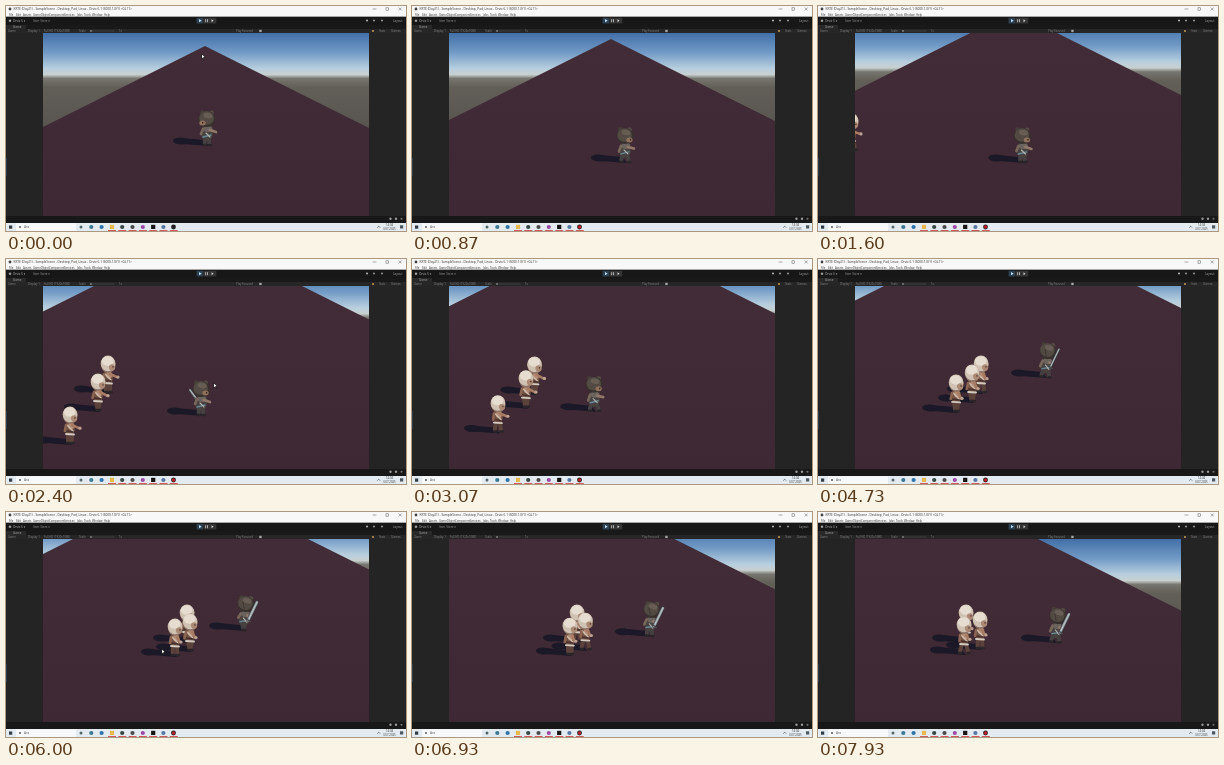
An HTML page with a canvas for the animation above (8 s loop, 400 by 225 pixels).

```html
<!DOCTYPE html>
<html lang="en">
<head>
<meta charset="utf-8">
<title>Game view</title>
<style>
html, body { margin: 0; width: 100%; height: 100%; overflow: hidden; background: #191919; }
#stage { position: relative; width: 400px; height: 225px; overflow: hidden; }
canvas { position: absolute; left: 0; top: 0; width: 400px; height: 225px; }
span { position: absolute; font: 3px/4px "Open Sans", sans-serif; white-space: pre; }
</style>
</head>
<body>
<div id="stage"><canvas id="view"></canvas></div>
<script>
const LOOP = 8000, STEP = 1000 / 15;
const stage = document.getElementById("stage");
const canvas = document.getElementById("view");
const ratio = Math.max(1, window.devicePixelRatio || 1);
canvas.width = 400 * ratio;
canvas.height = 225 * ratio;
const c = canvas.getContext("2d");
c.scale(ratio, ratio);

// Shared key times for the camera and the actors
const KEYS = [0, 870, 2400, 3800, 4730, 6000, 7930];
const leftEdge = [225, 211, 88, 66, 66, 67, -10];
const rightEdge = [173, 187, 296, 321, 319, 302, 220];
const skyShift = [0, 0, -14, -20, -20, -20, 0];
const hero = { x: [201, 213, 195, 168, 227, 237, 237], y: [113, 130, 130, 121, 92, 92, 104] };
const foes = [
  { x: [-60, -30, 102, 145, 163, 181, 148], y: [125, 125, 105, 107, 105, 101, 101] },
  { x: [-70, -40, 92, 138, 154, 184, 162], y: [145, 145, 123, 116, 114, 110, 108] },
  { x: [-95, -65, 64, 110, 138, 169, 146], y: [175, 175, 156, 132, 124, 115, 113] }
];

function at(list, t) {
  let i = 0;
  while (i < KEYS.length - 2 && t > KEYS[i + 1]) i++;
  const k = Math.min(1, (t - KEYS[i]) / (KEYS[i + 1] - KEYS[i]));
  return list[i] + (list[i + 1] - list[i]) * k;
}

function rect(color, x, y, w, h) {
  c.fillStyle = color;
  c.fillRect(x, y, w, h);
}

function oval(color, x, y, rx, ry = rx, turn = 0) {
  c.fillStyle = color;
  c.beginPath();
  c.ellipse(x, y, rx, ry, turn, 0, 7);
  c.fill();
}

function poly(color, ...p) {
  c.fillStyle = color;
  c.beginPath();
  for (let i = 0; i < p.length; i += 2) c.lineTo(p[i], p[i + 1]);
  c.closePath();
  c.fill();
}

function line(color, width, x1, y1, x2, y2) {
  c.strokeStyle = color;
  c.lineWidth = width;
  c.lineCap = "round";
  c.beginPath();
  c.moveTo(x1, y1);
  c.lineTo(x2, y2);
  c.stroke();
}

function ramp(y0, y1, stops) {
  const g = c.createLinearGradient(0, y0, 0, y1);
  stops.forEach(([k, color]) => g.addColorStop(k, color));
  return g;
}

function label(text, x, y, color = "#a8a8a8", size = 3) {
  const s = document.createElement("span");
  s.textContent = text;
  s.style.cssText = `left:${x}px;top:${y}px;color:${color};font-size:${size}px`;
  stage.append(s);
}

function addLabels() {
  label("KRTE (Day21) - SampleScene - Desktop, Pad, Linux - Orvix 6.1 (6000.1.0f1) <GL11>", 7.5, 1, "#333", 3.15);
  const menu = { File: 3, Edit: 10, Assets: 17, GameObject: 27, Component: 43, Services: 58, Jobs: 71, Tools: 78, Window: 86, Help: 98 };
  for (const name in menu) label(name, menu[name], 6.7, "#333", 2.8);
  label("Orvix 6 ▾", 7, 12.7, "#bbb");
  label("Item Store ▾", 27, 12.7, "#999");
  label("Game", 7, 18.6);
  const bar = { "Game": 2, "Display 1": 22, "Full HD (1920x1080)": 38, "Scale": 73, "1x": 113, "Play Focused": 230, "Stats": 373, "Gizmos": 385 };
  for (const name in bar) label(name, bar[name], 22.8, "#858585", 2.8);
  label("Layout", 387, 12.7);
  label("Ara", 18, 219, "#555", 3.2);
  label("14:04", 380, 217, "#333", 2.8);
  label("3.07.2025", 377, 220.6, "#333", 2.8);
}

function drawEditor(t) {
  rect("#191919", 0, 0, 400, 225);
  rect("#f8f8f8", 0, 0, 400, 10.8);
  oval("#444", 4, 3, 1.4);
  line("#555", .5, 367, 3, 370, 3);
  c.strokeStyle = "#555";
  c.strokeRect(380, 1.8, 2.4, 2.4);
  line("#555", .5, 393, 1.8, 395.4, 4.2);
  line("#555", .5, 395.4, 1.8, 393, 4.2);
  rect("#171717", 0, 10.8, 400, 8.2);
  oval("#999", 4, 14.7, 1.3);
  rect("#2c4052", 190.5, 11.8, 6.5, 5.7);
  rect("#343434", 197.3, 11.8, 13, 5.7);
  poly("#b8dcf4", 193, 13, 193, 16.3, 195.7, 14.7);
  rect("#ccc", 199.3, 13.2, .8, 3);
  rect("#ccc", 201, 13.2, .8, 3);
  poly("#ccc", 205.5, 13.2, 205.5, 16.2, 207.6, 14.7);
  oval("#aaa", 361, 14.5, 1.1);
  oval("#999", 368, 14.5, 1);
  oval("#999", 376, 14.5, 1);
  rect("#292929", 0, 19, 20, 4);
  rect("#262626", 0, 23, 400, 4.3);
  line("#555", .5, 84, 25, 108, 25);
  oval("#aaa", 85, 25, .8);
  rect("#aaa", 253.3, 23.8, 2.3, 2.3);
  oval("#c99b55", 367, 25, 1);
  rect("#242424", 0, 27, 400, 183);
  rect("#181818", 0, 210, 400, 7);
  oval("#999", 384.5, 212.7, 1.2);
  oval("#999", 390, 212.7, 1.2);
  oval("#777", 395.5, 212.7, 1);
  rect("#304158", 0, 152, .8, 18);

  rect("#e3ebf1", 0, 217, 400, 8);
  rect("#303a42", 3, 219.5, 3.2, 3.2);
  rect("#f7f8f9", 10, 217.3, 60, 7.7);
  oval("#666", 14, 221, 1.1);
  const icons = ["#566", "#3c7890", "#2e73aa", "#e6b84d", "#364642", "#4a4a4a", "#9b4ba5", "#151515", "#5777a2"];
  icons.forEach((color, i) => {
    if (i === 3 || i === 7) rect(color, 73 + 10.3 * i, 218.8, 4.2, 4.2);
    else oval(color, 75 + 10.3 * i, 221, i ? 2.1 : 1.5);
  });
  oval("#222", 167.5, 221, 2.4);
  if (t > 400) oval("#b51f2a", 167.5, 221, 1.7);
  for (let x = 102; x < 170; x += 10.3) rect("#d14a4a", x, 224.1, 8, .9);
  line("#4d575e", .6, 371.4, 221.5, 372.7, 220.2);
  line("#4d575e", .6, 372.7, 220.2, 374, 221.5);
  rect("#4d575e", 394, 219.3, 3.2, 3.2);
}

function drawGround(t) {
  const top = 27 + at(skyShift, t);
  rect(ramp(top, top + 99, [[0, "#426fa8"], [.2, "#729bc6"], [.36, "#b8cfdf"], [.42, "#c8d0cf"], [.46, "#77756f"], [.55, "#625e58"], [1, "#57534e"]]), 37, 27, 326, 183);
  const l = at(leftEdge, t), r = at(rightEdge, t);
  const x = (l + r) / 2, y = 27 + (l - r) / 4;
  poly(ramp(27, 210, [[0, "#422c37"], [1, "#3d2833"]]), x, y, x + 800, y + 400, x - 800, y + 400);
}

// Feet stand at (x, y); the light falls from the right
function drawShadow(x, y) {
  const color = "#1b1927";
  poly(color, x + 2, y + 1, x - 24, y - 1, x - 25, y - 7, x - 3, y - 5);
  oval(color, x - 26, y - 4, 8, 3.5, .06);
}

function drawLegs(x, y, color, swing) {
  line(color, 4, x - 2, y + 18, x - 2.3 + swing, y + 25);
  line(color, 4, x + 2, y + 18, x + 2.3 - swing, y + 25);
  line("#292528", 2.5, x - 3 + swing, y + 27, x - 1 + swing, y + 27);
  line("#292528", 2.5, x + 2 - swing, y + 27, x + 4 - swing, y + 27);
}

function drawFoe(x, y, t, swing) {
  const reach = t < 3400 ? 10 : 6, hand = y + (t < 3400 ? 13 : 15) + swing * .4;
  drawLegs(x, y + 1, "#5b423b", swing);
  oval("#70503f", x, y + 13, 5, 7.5);
  oval("#b48c74", x + 1, y + 11, 3, 3.5);
  line("#cdbcae", 1.5, x - 3, y + 10, x + 3, y + 16);
  line("#d3cac1", 1.8, x - 4, y + 19, x + 4, y + 19.5);
  line("#45302f", 1.4, x - 4, y + 16, x + 3, y + 17);
  line("#8c6552", 2.6, x - 4, y + 10, x - 5 - swing * .3, y + 16);
  line("#a87b65", 2.6, x + 2, y + 10, x + reach - 1, hand);
  oval("#bda294", x + reach, hand, 1.6);
  oval("#8f7467", x + .3, y + .6, 7.4, 8.4);
  oval("#cfc2b3", x, y - .6, 7.3, 7.8);
  oval("#e6dccf", x - .3, y - 3, 5.8, 4.8);
  oval("#ac8974", x + 4, y + 3.6, 3, 3.2, -.3);
  rect("#392c2c", x + 4.4, y + 2.2, 1.1, 1.4);
}

function drawSword(x1, y1, x2, y2, width) {
  line("#35383d", width + 1, x1, y1, x2, y2);
  line("#8f989d", width, x1, y1, x2, y2);
  line("#c5cbcc", width * .35, x1 + .4, y1 - 1, x2, y2);
  line("#494a4d", 1.4, x1 - 2.4, y1 - 2, x1 + 2.4, y1 + 1);
}

function drawHero(x, y, t, swing) {
  const armed = t >= 4300, away = t < 450;
  const raised = t > 1900 && t < 2800;
  c.save();
  c.translate(x, y + 27);
  c.rotate(armed ? .1 : 0);
  c.translate(-x, -y - 27);
  if (raised) drawSword(x - 4, y + 11, x - 11, y + 1, 1.8);
  drawLegs(x, y - 1, "#454042", swing);
  oval("#47413f", x, y + 14, 6, 8);
  oval("#6b645e", x + 1, y + 10, 4.5, 3);
  line("#668796", 1.4, x - 4, y + 18, x + 4, y + 16);
  line("#b5b4ae", 1.1, x - 1, y + 14, x + 3, y + 18);
  line("#77675b", 2.7, x - 4, y + 10, x - 6, y + 15 - swing * .4);
  line("#92786a", 2.7, x + 3, y + 11, x + (armed ? 5 : 9), y + 13 + swing * .3);
  oval("#453d37", x - 4.5, y - 6, 2.4, 2.8, -.3);
  oval("#544b43", x + 4.5, y - 5.8, 2.4, 2.8, .3);
  oval("#37312e", x, y, 8.3, 8);
  oval("#524a43", x - .4, y - 1, 7.3, 6.8);
  oval("#675d54", x + 1, y - 3.4, 4.5, 2.6, .2);
  if (!armed) {
    const side = away ? -1 : 1;
    oval("#8f705b", x + side * 4.5, y + 4, 3.2, 2.5);
    rect("#262321", x + side * 5, y + 3, 1.2, 1.5);
  } else {
    line("#3f3833", 1, x - 3, y - 2, x - 1, y + 5);
    drawSword(x + 4, y + 16, x + 11, y - 3, t > 5200 ? 2.6 : 1.5);
  }
  c.restore();
}

function drawCursor(x, y) {
  poly("#222", x - .6, y - 2.4, x - .6, y + 3.2, x + .8, y + 2, x + 2, y + 4, x + 2.8, y + 3.4, x + 1.9, y + 1.5, x + 3.5, y + 1.2);
  poly("#fff", x, y - 1.3, x, y + 2.2, x + 1, y + 1.3, x + 2, y + 3, x + 1.4, y + 1, x + 2.5, y + .8);
}

function drawScene(t) {
  c.save();
  c.beginPath();
  c.rect(37, 27, 326, 183);
  c.clip();
  drawGround(t);
  const cast = foes.map((p, i) => ({ x: at(p.x, t), y: at(p.y, t), feet: 29, swing: 1.6 * Math.sin(t / 95 + i * 1.4), draw: drawFoe }));
  cast.push({ x: at(hero.x, t), y: at(hero.y, t), feet: 26, swing: t < 200 ? 0 : 2 * Math.sin(t / 85), draw: drawHero });
  cast.sort((a, b) => a.y - b.y);
  cast.forEach(a => drawShadow(a.x, a.y + a.feet));
  cast.forEach(a => a.draw(a.x, a.y, t, a.swing));
  if (t < 450) drawCursor(196, 50);
  else if (t > 2100 && t < 2700) drawCursor(208, 126);
  else if (t > 5600 && t < 6500) drawCursor(156, 139);
  c.restore();
}

function tick(now) {
  const t = Math.floor((now % LOOP + 4) / STEP) * STEP;
  drawEditor(t);
  drawScene(t);
  requestAnimationFrame(tick);
}

addLabels();
tick(0);
</script>
</body>
</html>
```
